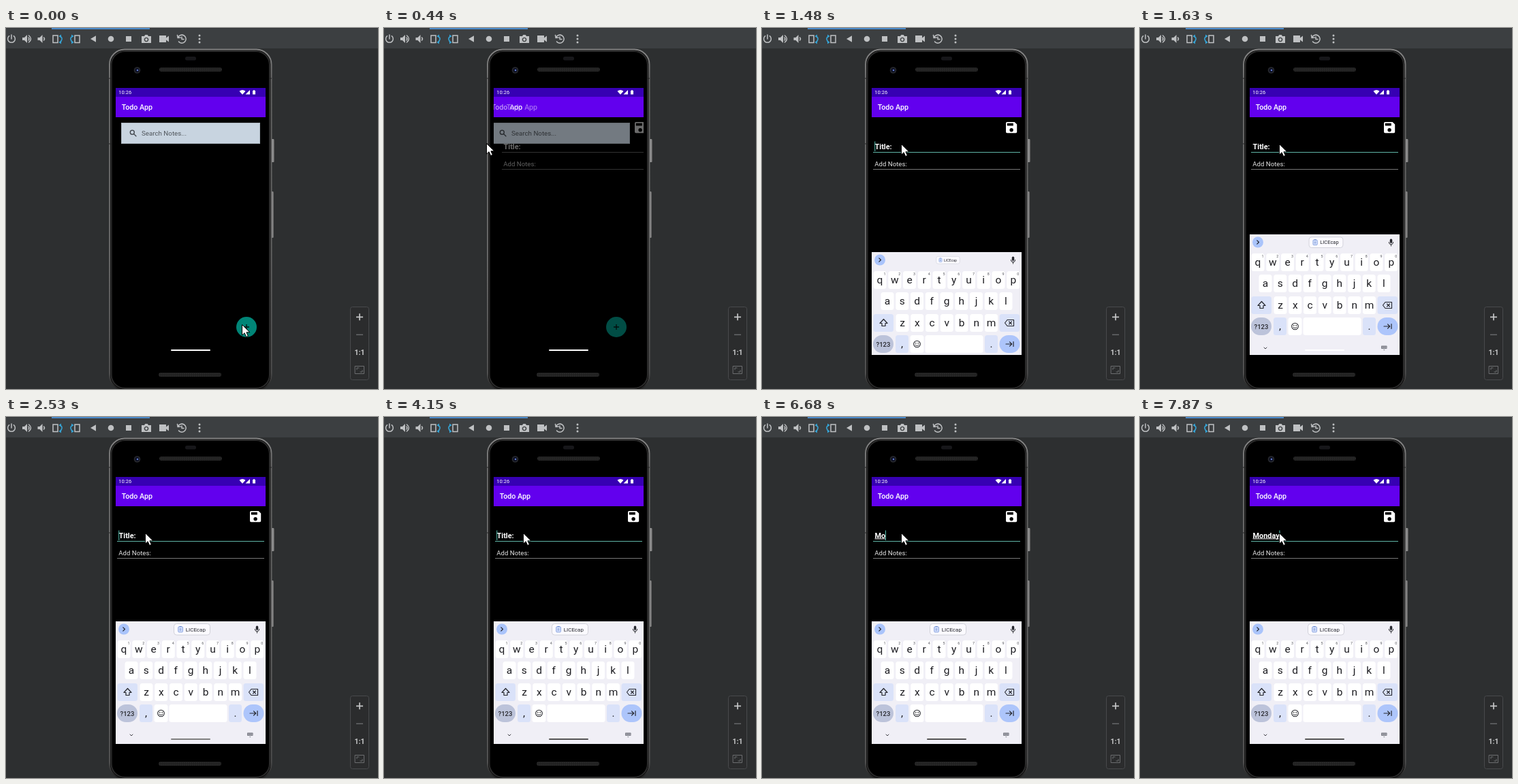
Animation, 546 px wide and 530 px high, one loop 8000 ms. Source, as an HTML page:

```html
<!DOCTYPE html>
<html lang="en">
<head>
<meta charset="utf-8">
<title>Todo App</title>
<style>
html, body { margin: 0; width: 100%; height: 100%; overflow: hidden; background: #2d2f30; }
svg { display: block; width: 546px; height: 530px; font-family: Roboto, "Noto Sans", sans-serif; }
text { white-space: pre; }
.key { font-size: 15.5px; fill: #1d1d22; text-anchor: middle; }
.hint { font-size: 5.4px; fill: #55565e; text-anchor: middle; }
.line { fill: none; stroke-linecap: round; stroke-linejoin: round; }
</style>
</head>
<body>
<svg viewBox="0 0 546 530" xmlns="http://www.w3.org/2000/svg">
  <defs>
    <clipPath id="screenClip"><rect x="161" y="88" width="220" height="392"/></clipPath>
    <linearGradient id="rim" x1="0" y1="0" x2="0" y2="1">
      <stop offset="0" stop-color="#858585"/><stop offset=".1" stop-color="#666"/>
      <stop offset=".6" stop-color="#666"/><stop offset=".95" stop-color="#505050"/><stop offset="1" stop-color="#1c1c1c"/>
    </linearGradient>
    <linearGradient id="button" x1="0" x2="1">
      <stop offset="0" stop-color="#555"/><stop offset=".5" stop-color="#a0a0a0"/><stop offset="1" stop-color="#4a4a4a"/>
    </linearGradient>
    <pattern id="mesh" width="3" height="3" patternUnits="userSpaceOnUse">
      <rect width="3" height="3" fill="#202020"/><rect width="1.5" height="1.5" fill="#2e2e2e"/>
    </pattern>
  </defs>

  <rect width="546" height="530" fill="#2d2f30"/>
  <rect width="546" height="30" fill="#3c3f41"/>
  <rect width="546" height="1" fill="#323436"/>
  <rect x="67" width="144" height="2" fill="#4a88c7"/>
  <g id="toolbar" fill="#bfc1c3"></g>

  <rect x="389" y="163" width="5" height="34" rx="1.5" fill="url(#button)"/>
  <rect x="389" y="240" width="4" height="68" rx="1.5" fill="url(#button)"/>
  <rect x="152" y="31.500" width="237.500" height="500" rx="22" fill="#020202" stroke="url(#rim)" stroke-width="2"/>
  <rect x="154.500" y="34" width="232.500" height="495" rx="20" fill="none" stroke="#2c2c2c" stroke-width="2"/>
  <rect x="157.500" y="37" width="226.500" height="490" rx="17" fill="#000"/>
  <path d="M151 74h4M386 74h4M151 170h4" stroke="#222"/>
  <rect x="263" y="42" width="16" height="5.500" rx="2.500" fill="#17171a"/>
  <rect x="225" y="58" width="92" height="6" rx="3" fill="url(#mesh)"/>
  <rect x="224" y="506" width="92" height="6" rx="3" fill="url(#mesh)"/>
  <circle cx="192.500" cy="62" r="4.800" fill="#26282d"/>
  <circle cx="192.500" cy="62" r="2.900" fill="#0a0d22"/>
  <circle cx="193" cy="62" r="1.300" fill="#5f78c8"/>

  <g clip-path="url(#screenClip)">
    <rect x="161" y="88" width="220" height="392"/>
    <rect x="161" y="101" width="220" height="30" fill="#6200ee"/>
    <g id="home">
      <text x="169.700" y="120" font-size="10.750" font-weight="500" fill="#fff">Todo App</text>
      <rect x="169.500" y="139.500" width="203" height="30" fill="#c8d4e0" stroke="#aab4be"/>
      <g class="line" stroke="#3c4248" stroke-width="1.300"><circle cx="185.300" cy="153.200" r="3"/><path d="M187.700 155.600l3.200 3.200"/></g>
      <text x="199" y="158" font-size="9.750" fill="#50565c">Search Notes...</text>
      <circle cx="353" cy="439" r="15" fill="#018577"/>
      <path d="M349 439h8M353 435v8" stroke="#061513" stroke-width="1.300"/>
    </g>
    <g id="editor">
      <rect x="161" y="131" width="220" height="349"/>
      <rect x="161" y="101" width="220" height="30" fill="#6200ee"/>
      <g id="form">
        <text x="169.700" y="120" font-size="10.750" font-weight="500" fill="#fff">Todo App</text>
        <path transform="translate(355.300 135.300) scale(.9)" fill="#fff" d="M17 3H5a2 2 0 0 0-2 2v14a2 2 0 0 0 2 2h14a2 2 0 0 0 2-2V7zm-5 16a3 3 0 1 1 0-6 3 3 0 0 1 0 6zm3-10H5V5h10z" fill-rule="evenodd"/>
        <rect id="titleRule" x="163" y="182" width="216" height="1"/>
        <rect x="163" y="207" width="216" height="1" fill="#777"/>
        <text id="titleText" x="165.500" y="178" font-size="10.900" font-weight="700" fill="#fff"></text>
        <rect id="composing" x="165.500" y="178.400" height="1" fill="#eee"/>
        <rect id="caret" y="166.500" width="1.100" height="14.500" fill="#52b5a6"/>
        <text x="165.300" y="203" font-size="9.650" fill="#e4e4e4">Add Notes:</text>
      </g>
    </g>
    <rect x="161" y="88" width="220" height="13" fill="#3700b3"/>
    <text x="165.300" y="97.400" font-size="7.600" fill="#fff">10:26</text>
    <path fill="#fff" d="M342.500 92.700q4.500-3.500 9 0l-4.500 5zM351.500 97.500h6.500v-6.500zM362 92h1v-.8h2v.8h1v5.500h-4z"/>
    <g id="keyboard"></g>
    <rect id="navHandle" x="242" y="472" width="58" height="2" rx="1"/>
  </g>

  <rect x="505.500" y="409.500" width="27" height="107" rx="3" fill="#2b2c2d" stroke="#484a4c"/>
  <path d="M514 424.300h10M519 419.300v10" stroke="#c4c5c6" stroke-width="1.700"/>
  <path d="M514 450.300h10" stroke="#66686a" stroke-width="1.500"/>
  <text x="519" y="479.500" font-size="10.500" font-weight="700" fill="#c9cacb" text-anchor="middle">1:1</text>
  <g class="line" stroke="#6c6e70"><rect x="512.500" y="496.500" width="13" height="11"/><path d="M515 501.500v-2.500h3M523 502.500v2.500h-3"/></g>

  <path id="pointer" d="M.5 .5v15.500l3.600-3.300 2.600 5.800 2.700-1.200-2.500-5.500h5z" fill="#fff" stroke="#000" stroke-linejoin="round"/>
</svg>
<script>
const LOOP = 8000;
const $ = id => document.getElementById(id);

// Toolbar icons, each drawn around its own centre.
const speaker = '<path d="M-6-2h3l4-4v12l-4-4h-3z"/>';
const phoneTurn = '<rect x="-6" y="-5" width="7" height="10.500" fill="none" stroke="#bfc1c3" stroke-width="1.500"/>' +
  '<path d="M4-4q3.500 1.500 3 4.500t-3 4.500" class="line" stroke="#35a3d4" stroke-width="1.600"/>' +
  '<path d="M2.500-4l3.500-2.500v5zM2.500 5l3.500-2.500v5z" fill="#35a3d4"/>';
const outline = d => `<path d="${d}" class="line" stroke="#bfc1c3" stroke-width="1.500"/>`;
const icons = [
  [8, outline('M0-6v6M-3.300-4.300a5.400 5.400 0 1 0 6.600 0')],
  [30, speaker + outline('M3-2q2 2 0 4M3.500-5q6 5 0 10')],
  [52.5, speaker + outline('M3-2q2 2 0 4')],
  [75, phoneTurn],
  [102, `<g transform="scale(-1 1)">${phoneTurn}</g>`],
  [128, '<path d="M-4 0l8-4.800v9.600z"/>'],
  [154, '<circle r="4.300"/>'],
  [180, '<rect x="-4" y="-4" width="8" height="8"/>'],
  [206, '<path fill-rule="evenodd" d="M-7-4h4l1.300-2h3.400l1.300 2h4v10h-14zM0-2.300a3.300 3.300 0 1 0 .01 0z"/><circle cy="1" r="1.900"/>'],
  [232, '<path d="M-7-5h10v3.500l4-3v9l-4-3v3.500h-10z"/>'],
  [258, outline('M-5.500-2a6 6 0 1 1 1 6M-6.500-5.500l.7 4 4-.6M0-3v3.500h3')],
  [284, '<circle cy="-5" r="1.500"/><circle r="1.500"/><circle cy="5" r="1.500"/>']
];
$('toolbar').innerHTML = icons.map(([x, art]) => `<g transform="translate(${x} 16)">${art}</g>`).join('');

function buildKeyboard() {
  const box = (x, y, w, fill = '#fff', r = 3.5) =>
    `<rect x="${x}" y="${y - 13}" width="${w}" height="26" rx="${r}" fill="${fill}"/>`;
  const key = (c, x, y, fill) => box(x - 9.5, y, 19, fill) + `<text class="key" x="${x}" y="${y + 5}">${c}</text>`;
  const row = (letters, x, y) => [...letters].map((c, i) => key(c, x + i * 21.75, y)).join('');
  const stroke = (d, w = 1.2) => `<path d="${d}" class="line" stroke="#25262c" stroke-width="${w}"/>`;
  const hints = [...'1234567890'].map((c, i) => `<text class="hint" x="${180 + i * 21.75}" y="334">${c}</text>`).join('');
  return `<rect x="161" y="300" width="220" height="210" fill="#f0eff6"/>
    <circle cx="173" cy="311.500" r="8" fill="#aac4fb"/>${stroke('M171.800 308.800l2.700 2.700-2.700 2.700')}
    <g id="chip"><rect x="246.500" y="303.500" width="53" height="16.500" rx="4" fill="#fbfaff" stroke="#d2d2da"/>
      <rect x="252.800" y="308" width="6.600" height="7.800" rx="1" fill="#dce6ff" stroke="#839fdc"/>
      <path d="M254.500 307.500h3.200M254.500 311h3M254.500 313h3" stroke="#6f8ed1"/>
      <text x="263.700" y="314.600" font-size="8" fill="#25262c">LICEcap</text></g>
    <rect x="366.800" y="306.500" width="3.400" height="6.500" rx="1.700" fill="#25262c"/>
    ${stroke('M365.300 311.500q.2 3.300 3.200 3.300t3.200-3.300M368.500 315v2', 1)}
    ${row('qwertyuiop', 173, 341)}${hints}${row('asdfghjkl', 184, 372)}${row('zxcvbnm', 206, 404)}
    ${box(163.5, 404, 29.5, '#dae2f9')}${stroke('M178.500 398.500l5.500 6h-3v4h-5v-4h-3z')}
    ${box(348.5, 404, 29.5, '#dae2f9')}${stroke('M356.500 404l3.500-4.500h9.500v9h-9.500zM362.500 402l4 4M366.500 402l-4 4', 1.1)}
    ${box(163, 435, 30, '#bcc3da', 13)}<text x="178" y="438.500" font-size="9.500" font-weight="500" fill="#25262c" text-anchor="middle">?123</text>
    ${key(',', 205.5, 435, '#dae2f9')}${box(217.5, 435, 20)}
    <circle cx="227.500" cy="435" r="4.800" fill="none" stroke="#25262c" stroke-width="1.100"/>
    <circle cx="225.800" cy="433.700" r=".8"/><circle cx="229.200" cy="433.700" r=".8"/>${stroke('M225 436.500q2.500 2.600 5 0', 1)}
    ${box(239.5, 435, 85)}${key('.', 336.5, 435, '#dae2f9')}
    ${box(348.5, 435, 30, '#adc5fb', 13)}${stroke('M358 435h8.500M363.500 431.800l3.200 3.200-3.200 3.200M369 431.500v7')}
    ${stroke('M182 466l2 2 2-2', .9)}
    <rect x="354" y="463.500" width="8.500" height="4.500" rx=".7" fill="#777982"/>
    <path d="M355 465h7M355 466.600h7" stroke="#f0eff6" stroke-width=".6" stroke-dasharray="1 .6"/>
    <path d="M357 469.200h2.600l-1.300 1.200z" fill="#777982"/>`;
}
$('keyboard').innerHTML = buildKeyboard();

// Each track holds [start time, ...values] until the next entry.
const pointerTrack = [[0, 346, 435], [140, 318, 398], [290, 214, 262], [440, 150, 169], [590, 156, 170], [740, 178, 171], [890, 204, 170]];
// Progress of the page slide and opacity of the incoming page.
const pageTrack = [[0, 0, 0], [440, .545, .42], [590, .92, 1], [740, .99, 1], [890, 1, 1]];
const keyboardTrack = [[0, 190, .65], [1480, 29, .65], [1630, 3, .94], [1780, 0, 1]];
const handleTrack = [[0, 255], [2080, 225], [2230, 180], [2530, 128], [2670, 112], [2960, 96], [3110, 84]];
const caretTrack = [[0, 0], [1040, 1], [1630, 0], [2080, 1], [2670, 0], [3110, 1], [3710, 0], [4150, 1], [4750, 0], [5190, 1]];
// Typed text and the number of underlined letters.
const typingTrack = [[0, '', 0], [5790, 'Mo', 2], [5930, 'Mom', 2], [6230, 'Mom', 3], [6530, 'Mo', 2],
  [6980, 'Mon', 3], [7120, 'Mond', 4], [7270, 'Monda', 5], [7570, 'Monday', 5], [7870, 'Monday', 6]];

const at = (track, t) => track.findLast(entry => entry[0] <= t).slice(1);
const move = (id, x, y) => $(id).setAttribute('transform', `translate(${x} ${y})`);
const set = (id, name, value) => $(id).setAttribute(name, value);

function render(t) {
  move('pointer', ...at(pointerTrack, t));

  const [slide, alpha] = at(pageTrack, t);
  move('home', -22 * slide, 0);
  move('form', 22 * (1 - slide), 0);
  set('editor', 'opacity', alpha);
  set('titleRule', 'fill', t < 1040 ? '#777' : '#5fb5a6');

  const [drop, scale] = at(keyboardTrack, t);
  move('keyboard', 0, drop);
  set('chip', 'transform', `translate(273 311.700) scale(${scale}) translate(-273 -311.700)`);
  const [shade] = at(handleTrack, t);
  set('navHandle', 'fill', `rgb(${shade},${shade},${shade})`);

  const [typed, marked] = at(typingTrack, t);
  const label = $('titleText');
  label.textContent = typed || 'Title:';
  set('composing', 'width', marked ? label.getSubStringLength(0, marked) : 0);
  set('caret', 'x', 165.2 + (typed ? label.getComputedTextLength() : 0));
  set('caret', 'opacity', at(caretTrack, t)[0]);
}

const start = performance.now();
function tick() {
  render((performance.now() - start) % LOOP);
  requestAnimationFrame(tick);
}
tick();
</script>
</body>
</html>
```
